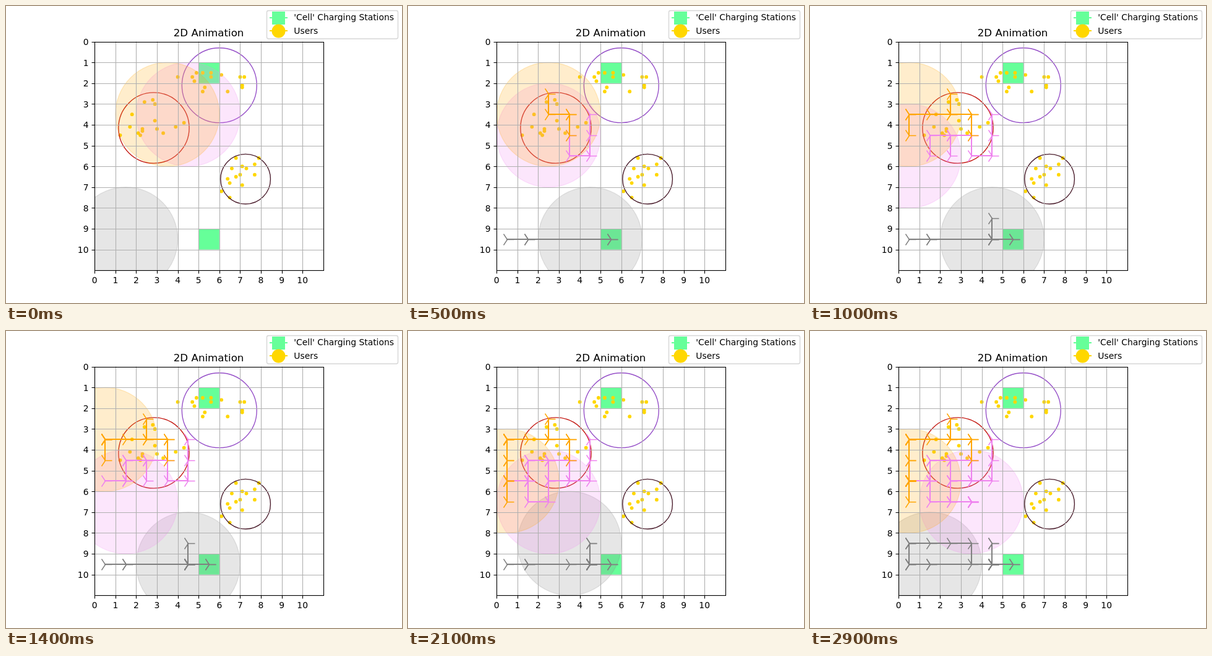
An HTML page that plays this animation: 640x480 px, repeating every 3 s.

```html
<!DOCTYPE html>
<html lang="en">
<head>
<meta charset="utf-8">
<title>2D Animation</title>
<style>
  html, body { margin: 0; width: 100%; height: 100%; overflow: hidden; background: #fff; }
  svg { display: block; width: 640px; height: 480px; }
  text { font: 13.89px "DejaVu Sans", sans-serif; fill: #000; }
  .title { font-size: 16.67px; text-anchor: middle; }
  .x { text-anchor: middle; }
  .y { text-anchor: end; }
  .grid { stroke: #b0b0b0; stroke-width: 1.11; }
  .frame { fill: none; stroke: #000; stroke-width: 1.11; }
  .ring { fill: none; stroke-width: 1.39; }
  .range { fill-opacity: .2; stroke-opacity: .2; stroke-width: 1.39; }
  .trail { fill: none; stroke-width: 2.08; stroke-linecap: square; stroke-linejoin: round; }
  .mark { fill: none; stroke-width: 1.39; }
</style>
</head>
<body>
<svg viewBox="0 0 640 480">
  <clipPath id="plot"><rect x="143.2" y="57.6" width="369.6" height="369.6"/></clipPath>
  <g id="scene" clip-path="url(#plot)"></g>
  <g id="axes"></g>
  <text class="title" x="327.6" y="49.3">2D Animation</text>
  <g id="legend">
    <rect x="421.5" y="7.5" width="212" height="45.5" rx="2.8" fill="#fff" fill-opacity=".8" stroke="#ccc" stroke-opacity=".8" stroke-width="1.39"/>
    <path d="M426 19H455" stroke="#6f9" stroke-width="2.08"/>
    <rect x="430" y="9" width="21" height="21" fill="#6f9"/>
    <path d="M426 40H455" stroke="gold" stroke-width="2.08"/>
    <circle cx="440.5" cy="40.5" r="11" fill="gold"/>
    <text x="465.3" y="23.3">'Cell' Charging Stations</text>
    <text x="465.3" y="45">Users</text>
  </g>
</svg>
<script>
const UNIT = 33.6, SIZE = 11, STEP = 100, STEPS = 30;
const px = x => 143.2 + x * UNIT;
const py = y => 57.6 + y * UNIT;
const snap = v => Math.floor(v + 0.5);
const scene = document.getElementById('scene');
const axes = document.getElementById('axes');

function add(parent, tag, attrs, text) {
  const el = document.createElementNS('http://www.w3.org/2000/svg', tag);
  for (const key in attrs) el.setAttribute(key, attrs[key]);
  if (text !== undefined) el.textContent = text;
  return parent.appendChild(el);
}

// Each user group: ring centre, radius, colour, then x, y pairs of its users.
const groups = [
  { x: 6, y: 2.1, r: 1.8, color: '#9650c8', users: [
    4, 1.7, 4.7, 1.7, 4.8, 1.9, 4.9, 1.5, 5.2, 1.5, 5.6, 1.5, 5.6, 1.7, 6.1, 1.6,
    5.3, 2.2, 5.2, 2.4, 6.4, 2.4, 7, 1.7, 7.2, 1.7, 7.1, 2.1, 7.1, 2.2] },
  { x: 2.85, y: 4.15, r: 1.7, color: '#c41a14', users: [
    2.4, 2.9, 2.8, 2.8, 2.9, 3, 1.8, 3.5, 2.9, 3.8, 1.7, 4.1, 1.23, 4.5, 2.1, 4.4,
    2.2, 4.5, 2.3, 4.2, 2.3, 4.3, 3, 4.2, 3.3, 4.4, 3.9, 4.1, 4.3, 3.9] },
  { x: 7.26, y: 6.61, r: 1.2, color: '#4b1e2d', users: [
    6.8, 5.6, 7.9, 5.6, 7.7, 5.9, 7.1, 6, 6.6, 6.1, 7.3, 6.1, 7, 6.4, 7.7, 6.4,
    6.8, 6.5, 6.4, 6.6, 6.5, 6.8, 7.1, 6.9, 6.1, 7.2, 6.5, 7.5] }
];

// Moves are one letter per step; R is the long hop to a station, a dot waits.
const MOVES = { u: [0, -1], d: [0, 1], l: [-1, 0], r: [1, 0], R: [4, 0] };
const agents = [
  { color: '#808080', start: [1.5, 9.5], moves: 'lrR.lud.......ud...lulll.dudr' },
  { color: '#ee82ee', start: [4.5, 3.5], moves: 'ddlulduldlruddruurdldr' },
  { color: '#ffa500', start: [3.5, 3.5], moves: 'duludlldu.....dddu' }
];

function walk({ start, moves }) {
  const path = [start];
  for (let i = 1; i < STEPS; i++) {
    const [x, y] = path[i - 1];
    const [dx, dy] = MOVES[moves[i - 1]] || [0, 0];
    path.push([x + dx, y + dy]);
  }
  return path;
}

for (const y of [1, 9])
  add(scene, 'rect', { x: px(5), y: py(y), width: UNIT, height: UNIT, fill: '#6f9' });

for (const { x, y, r, color, users } of groups) {
  for (let i = 0; i < users.length; i += 2)
    add(scene, 'circle', { cx: px(users[i]), cy: py(users[i + 1]), r: 2.9, fill: 'gold' });
  add(scene, 'circle', { class: 'ring', cx: px(x), cy: py(y), r: r * UNIT, stroke: color });
}

for (const a of agents) {
  a.path = walk(a);
  a.range = add(scene, 'circle', { class: 'range', r: 2.5 * UNIT, fill: a.color, stroke: a.color });
}

for (let i = 0; i < SIZE; i++) {
  const x = snap(px(i)) + 0.5, y = snap(py(i)) + 0.5;
  add(scene, 'path', { class: 'grid', d: `M${x} 57V428M143 ${y}H513` });
  add(axes, 'path', { class: 'frame', d: `M${x} 427.5v5M143.5 ${y}h-5` });
  add(axes, 'text', { class: 'x', x: px(i), y: 447.7 }, i);
  add(axes, 'text', { class: 'y', x: 133.5, y: py(i) + 5.3 }, i);
}
add(axes, 'rect', { class: 'frame', x: 143.5, y: 58.5, width: 370, height: 369 });

for (const a of agents) {
  a.points = a.path.map(([x, y]) => [snap(px(x)), snap(py(y))]);
  a.trail = add(scene, 'polyline', { class: 'trail', stroke: a.color });
  a.marks = a.points.map(([x, y]) => add(scene, 'path', {
    class: 'mark', stroke: a.color,
    d: `M${x + 0.5} ${y + 0.5}h11m-11 0l-6 -9m6 9l-6 9`
  }));
}

function show(step) {
  for (const a of agents) {
    const [x, y] = a.path[step];
    a.range.setAttribute('cx', px(x));
    a.range.setAttribute('cy', py(y));
    a.trail.setAttribute('points', step > 1 ? a.points.slice(0, step).join(' ') : '');
    a.marks.forEach((m, i) => { m.style.display = i < step ? '' : 'none'; });
  }
}

const begin = performance.now();
let last = 0;
function tick() {
  const step = Math.floor((performance.now() - begin) / STEP) % STEPS;
  if (step !== last) show(last = step);
  requestAnimationFrame(tick);
}
show(0);
requestAnimationFrame(tick);
</script>
</body>
</html>
```
